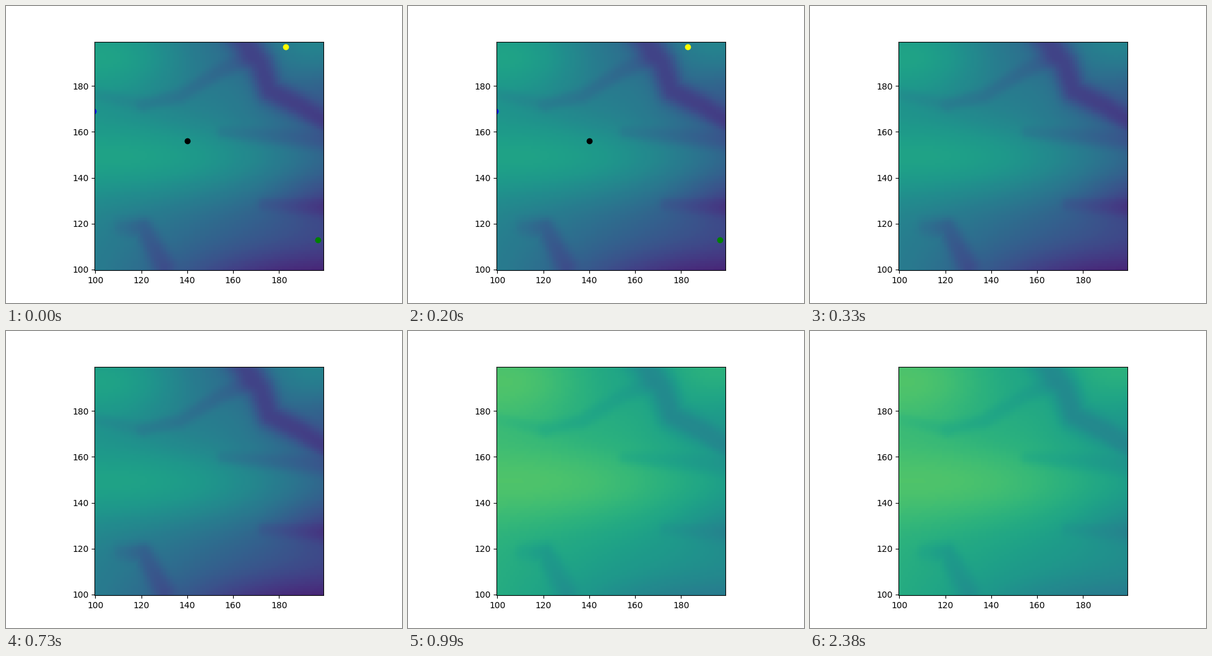
A matplotlib script that plays this animation: 640x480 px, repeating every 3300 ms.

```python
import numpy as np
import matplotlib.pyplot as plt
from matplotlib.animation import FuncAnimation

STEP_MS, STEPS = 330, 10
SIZE = 100
VIEW = (99.66, 199.26)

# Hills and basins: centre x, centre y, spread x, spread y, height.
HILLS = [
    (140, 149, 75, 20, .20),
    (110, 193, 35, 20, .165),
    (200, 200, 30, 20, .22),
    (160, 176, 20, 12, .05),
    (200, 131, 20, 10, -.06),
    (180, 95, 50, 13, -.15),
]

# Valleys: path, (start, end) height, (start, end) half width.
VALLEYS = [
    ([(100, 176), (121, 172)], (.49, .44), (3, 3)),
    ([(121, 172), (137, 175.5), (155, 187), (166, 192)], (.42, .28), (3, 4)),
    ([(163, 202), (172, 190), (176, 178), (189, 171.5), (201, 164)],
     (.18, .16), (7, 5)),
    ([(156, 160), (200, 157)], (.41, .25), (3, 5)),
    ([(174, 128), (200, 127)], (.27, .14), (3, 4)),
    ([(112, 118), (121, 118), (130, 101)], (.36, .22), (4, 5)),
]

MARKS = [(140, 156, "black"), (99, 169, "blue"),
         (183, 197, "yellow"), (197, 113, "green")]

Y, X = np.mgrid[:SIZE, :SIZE] + 100


def hill(cx, cy, sx, sy, height):
    return height * np.exp(-((X - cx) / sx)**2 - ((Y - cy) / sy)**2)


def carve(land, path, heights, widths):
    px, py = np.array(path, float).T
    t = np.linspace(0, 1, 80)
    knots = np.linspace(0, 1, len(path))
    x, y = np.interp(t, knots, px), np.interp(t, knots, py)
    d2 = (X[..., None] - x)**2 + (Y[..., None] - y)**2
    nearest = t[d2.argmin(axis=2)]
    bed = np.interp(nearest, (0, 1), heights)
    width = np.interp(nearest, (0, 1), widths)
    w = .85 * np.exp(-(d2.min(axis=2) / width**2)**1.2)
    return land + w * np.minimum(bed - land, 0)


def make_land():
    land = .425 - .2 * (X - 100) / SIZE + sum(hill(*h) for h in HILLS)
    for valley in VALLEYS:
        land = carve(land, *valley)
    return land


fig, ax = plt.subplots(figsize=(6.4, 4.8), dpi=100)
image = ax.imshow(make_land(), origin="lower", extent=VIEW * 2,
                  cmap="viridis", vmin=0, vmax=1)
dots = [ax.scatter(x, y, color=c) for x, y, c in MARKS]
ax.set(xlim=VIEW, ylim=VIEW)


def update(i):
    for dot in dots:
        dot.set_visible(i == 0)
    # Lowering the colour floor brightens the whole map.
    image.set_clim(0 if i < 3 else -.527, 1)
    return [image, *dots]


anim = FuncAnimation(fig, update, frames=STEPS, interval=STEP_MS,
                     repeat=True, repeat_delay=0)
plt.show()
```
